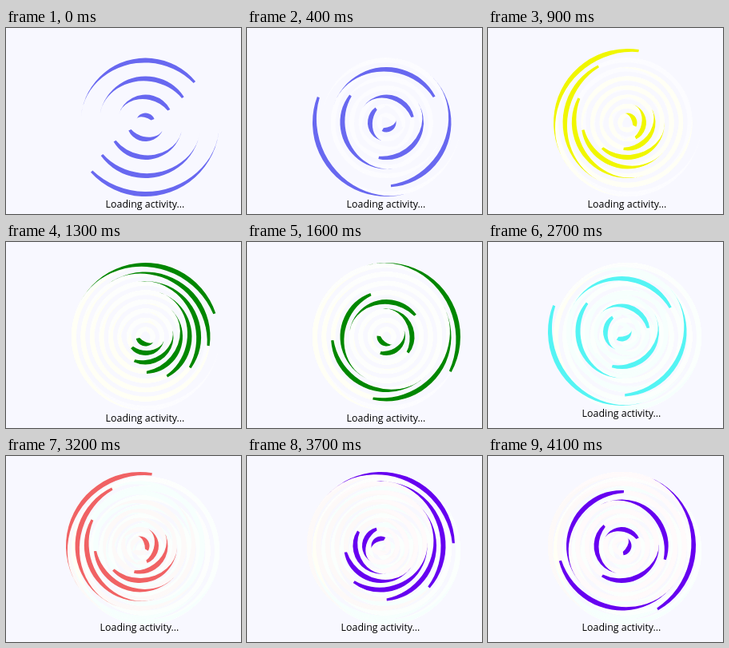
Animation of 294 by 233 pixels, one loop 4200 ms. Source, as an HTML page with a canvas:

```html
<!DOCTYPE html>
<html lang="en">
<head>
<meta charset="utf-8">
<title>Loading activity</title>
<style>
  html, body { margin: 0; width: 100%; height: 100%; overflow: hidden; background: #f8f8ff; }
  canvas { display: block; }
</style>
</head>
<body>
<canvas id="stage" width="294" height="233"></canvas>
<script>
const ctx = document.getElementById('stage').getContext('2d');
const STEP_MS = 100, STEPS = 42, STEPS_PER_COLOR = 6;
const RINGS = 8, RADIUS = 92.5, SPACING = 11.5, THICKNESS = 6;
const START_ANGLE = 182.8, STEP_ANGLE = 15.68;

// Arc colour and the pale trail it leaves behind
const PALETTE = [
  ['#6868f0', '#fcfcff'],
  ['#f0f600', '#fffff5'],
  ['#008600', '#fdfefd'],
  ['#00c3aa', '#fbfffd'],
  ['#54f4f4', '#f6fffd'],
  ['#f06264', '#fdf9f8'],
  ['#6600f0', '#fffafb'],
];

const paletteAt = step => PALETTE[Math.floor(step / STEPS_PER_COLOR)];
const centerAt = step => step < 24 ? [174.5, 118.5] : [167.5, 112.5];

// Crescent between a circle and a flatter ellipse, cut off at 45° on the right
function crescent(r) {
  const inner = r - THICKNESS;
  ctx.beginPath();
  ctx.arc(0, 0, r, -Math.PI, -Math.PI / 4);
  ctx.ellipse(0, 0, r, inner, 0, -Math.atan2(r, inner), -Math.PI, true);
  ctx.fill();
}

// Each ring is nested in the one outside it, so the rotations add up
function drawRings(step, color) {
  const turn = (START_ANGLE + step * STEP_ANGLE) * Math.PI / 180;
  ctx.save();
  ctx.translate(...centerAt(step));
  ctx.fillStyle = color;
  for (let i = 0; i < RINGS; i++) {
    ctx.rotate(turn);
    crescent(RADIUS - i * SPACING);
  }
  ctx.restore();
}

function draw(step) {
  ctx.fillStyle = '#f8f8ff';
  ctx.fillRect(0, 0, 294, 233);
  for (let past = 0; past < step; past++) drawRings(past, paletteAt(past + 1)[1]);
  drawRings(step, paletteAt(step)[0]);

  const [x, y] = centerAt(step);
  ctx.fillStyle = '#000';
  ctx.font = '12.4px "Open Sans", "Noto Sans", sans-serif';
  ctx.textAlign = 'center';
  ctx.fillText('Loading activity...', x - 0.5, y + 106.5);
}

function tick() {
  draw(Math.floor(performance.now() / STEP_MS) % STEPS);
  requestAnimationFrame(tick);
}
tick();
</script>
</body>
</html>
```
